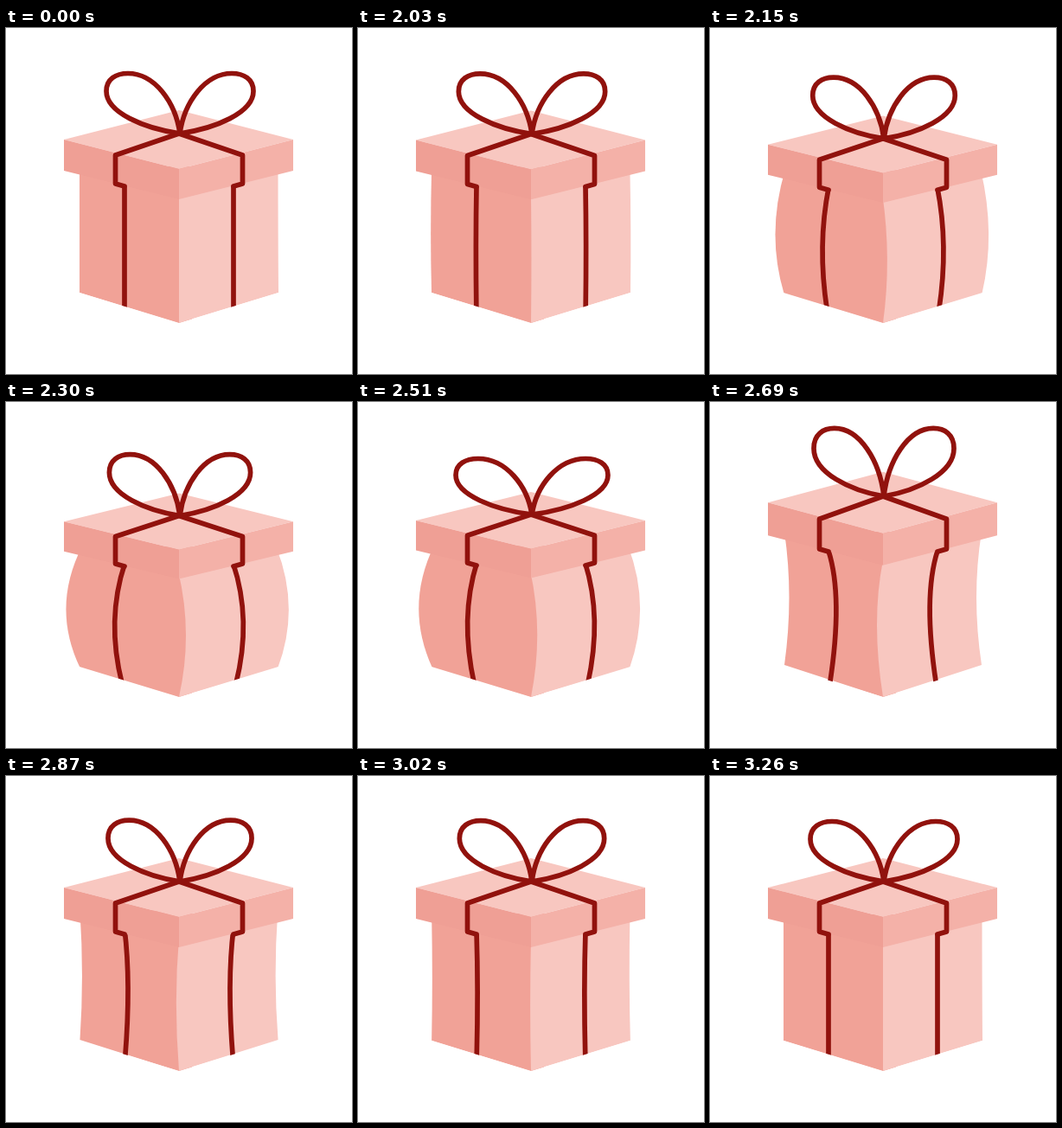
Recreate the animation shown at these times as an HTML page without scripts. Size 400 by 400 pixels, loop 3.35 s.

```html
<!DOCTYPE html>
<html lang="en">
<head>
<meta charset="utf-8">
<title>Bouncing gift box</title>
<style>
  html, body { margin: 0; width: 100%; height: 100%; overflow: hidden; background: #fff; }
  svg { display: block; width: 100%; height: 100%; }

  :root {
    --sink: cubic-bezier(.5, 1, .89, 1);
    --swing: cubic-bezier(.37, 0, .63, 1);
    --settle: cubic-bezier(.2, .6, .1, 1);
  }

  .ribbon { fill: none; stroke: #91120d; stroke-width: 5.7; stroke-linejoin: round; }
  .ribbon path { vector-effect: non-scaling-stroke; }

  .body, .lid, .top, .bow { animation: 3350ms var(--swing) infinite; }
  .body { animation-name: morph; d: var(--rest); }
  .lid { animation-name: hop; }
  .top { animation-name: press; transform-origin: 200px 122px; }
  .bow { animation-name: flutter; transform-origin: 201px 122px; }

  /* Each part of the body bends between three poses. */
  .left {
    --rest: path("M85 160Q85 238 85 306L215 346V160Z");
    --squash: path("M88 168Q49 238 86 308L215 346V168Z");
    --stretch: path("M86 150Q97 225 86 304L215 346V150Z");
  }
  .right {
    --rest: path("M200 190Q200 268 200 341L315 306Q314.5 238 314.5 160Z");
    --squash: path("M199 196Q218 268 200 341L314 308Q343 238 312 168Z");
    --stretch: path("M200 183Q186 253 200 341L314 304Q302 225 314 150Z");
  }
  .band {
    --rest: path("M137 180Q137 250 137 326");
    --squash: path("M137.5 187Q113.5 252 134 326");
    --stretch: path("M137 172Q154 225 138.5 326");
  }

  @keyframes morph {
    0% { d: var(--rest); }
    59.7% { d: var(--rest); animation-timing-function: var(--sink); }
    73.6% { d: var(--squash); }
    80.3% { d: var(--stretch); animation-timing-function: var(--settle); }
    97.3%, 100% { d: var(--rest); }
  }
  @keyframes hop {
    0% { translate: 0 0; }
    59.7% { translate: 0 0; animation-timing-function: var(--sink); }
    73.6% { translate: 0 10.4px; }
    80.3% { translate: 0 -13px; }
    85.7%, 100% { translate: 0 0; }
  }
  @keyframes press {
    0% { scale: 1 1; }
    59.7% { scale: 1 1; animation-timing-function: var(--sink); }
    73.6% { scale: 1 .955; }
    80.3% { scale: 1 1.05; }
    85.7%, 100% { scale: 1 1; }
  }
  @keyframes flutter {
    0% { scale: 1 1; }
    59.7% { scale: 1 1; animation-timing-function: var(--sink); }
    68.7% { scale: .96 1.02; }
    74.9% { scale: 1.035 .93; }
    80.3% { scale: .953 1.13; }
    85.7% { scale: .977 1.02; }
    97.3%, 100% { scale: 1 1; }
  }
</style>
</head>
<body>
<svg viewBox="0 0 400 400" role="img" aria-label="Gift box">
  <clipPath id="floor"><path d="M0 0H400V280L200 341L0 280Z"/></clipPath>

  <g clip-path="url(#floor)">
    <path class="body left" fill="#f1a297"/>
    <path class="body right" fill="#f8c7c0"/>
    <g class="ribbon">
      <path class="body band"/>
      <g transform="matrix(-1 0 0 1 400 0)"><path class="body band"/></g>
    </g>
  </g>

  <g class="lid">
    <g class="top">
      <path fill="#f8c7c0" d="M67 129L200 95L332 129L200 163Z"/>
      <path fill="#ef9f95" d="M67 129L200 163V198L67 165Z"/>
      <path fill="#f4b1a8" d="M332 129L200 163V198L332 165Z"/>
      <g class="ribbon" stroke-linecap="round">
        <path d="M137 183L126.5 180V147L200 122L273.5 147V180L263 183"/>
      </g>
    </g>
    <g class="bow ribbon">
      <path d="M201 122C160 116 116 98 116 73C116 59 127 52.5 141 52.5C172 52.5 196 86 201 122C206 86 230 52.5 261 52.5C275 52.5 286 59 286 73C286 98 242 116 201 122Z"/>
    </g>
  </g>
</svg>
</body>
</html>
```
